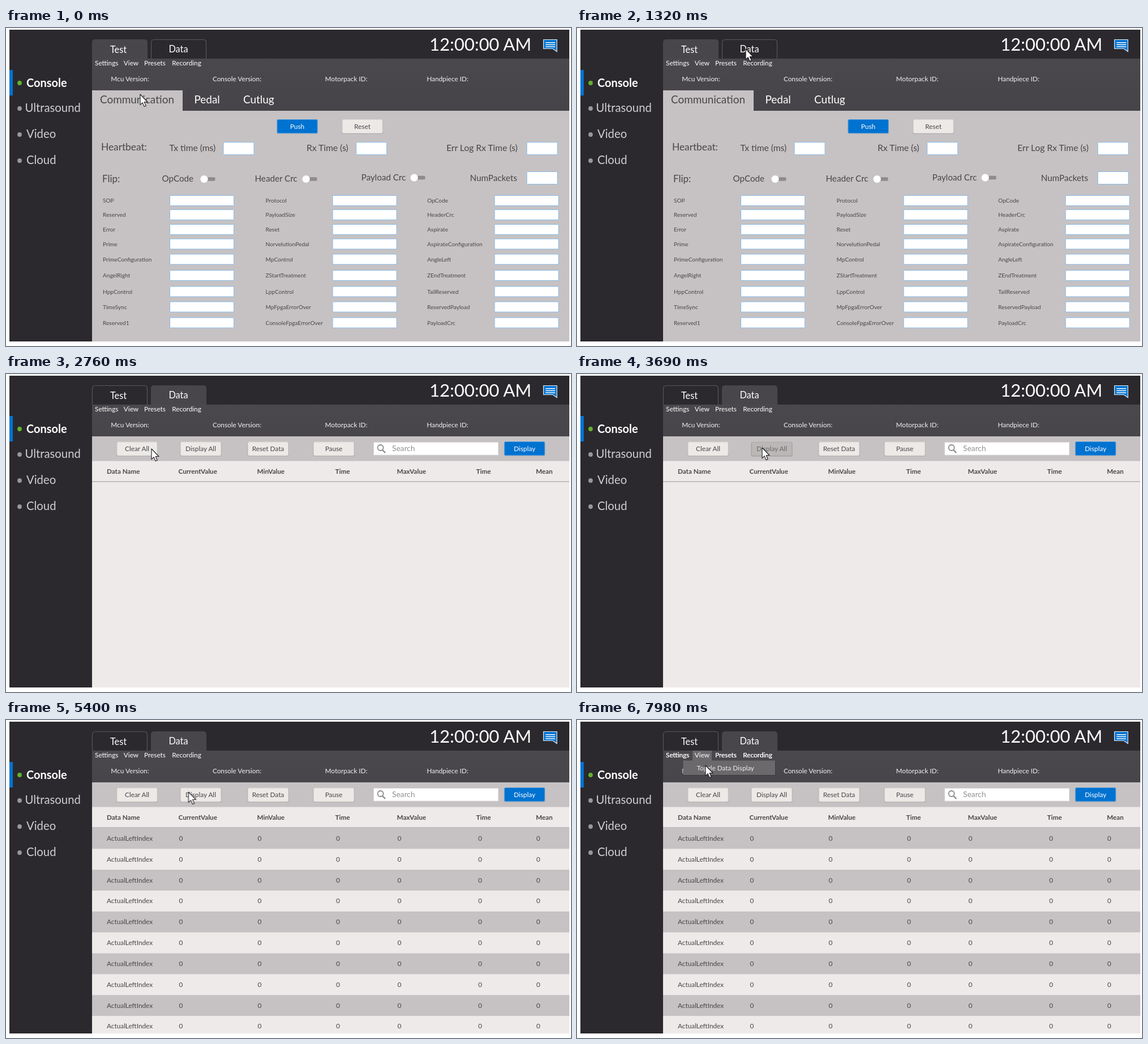
Animation of 998 by 561 pixels, one loop 8000 ms. Source, as an HTML page:

```html
<!DOCTYPE html>
<html lang="en">
<head>
<meta charset="utf-8">
<title>Console</title>
<style>
html, body { margin: 0; width: 100%; height: 100%; overflow: hidden; background: #fff; }
svg { display: block; width: 998px; height: 561px; }
text { font-family: Lato, "Open Sans", sans-serif; white-space: pre; }
.show { animation: 8s step-end infinite; }
#test { animation-name: test; }
#data { animation-name: data; }
#rows { animation-name: rows; }
#clearPress { animation-name: clearPress; }
#displayPress { animation-name: displayPress; }
#menu { animation-name: menu; }
#cursor { animation: cursor 8s infinite; }
@keyframes test { 0% { visibility: visible; } 17.625%, 100% { visibility: hidden; } }
@keyframes data { 0% { opacity: 0; } 17.625%, 100% { opacity: 1; } }
@keyframes rows { 0% { opacity: 1; } 34.5% { opacity: 0; } 56.625%, 100% { opacity: 1; } }
@keyframes clearPress { 0% { opacity: 0; } 31.5% { opacity: 1; } 34.5%, 100% { opacity: 0; } }
@keyframes displayPress { 0% { opacity: 0; } 45.75% { opacity: 1; } 56.625%, 100% { opacity: 0; } }
@keyframes menu { 0% { opacity: 0; } 90%, 100% { opacity: 1; } }
@keyframes cursor {
  0%, .75% { transform: translate(237px, 117px); animation-timing-function: ease-in-out; }
  15%, 25.875% { transform: translate(298px, 37px); animation-timing-function: ease-in; }
  28.5% { transform: translate(281px, 107px); animation-timing-function: ease-out; }
  31.875%, 40.125% { transform: translate(257px, 132px); animation-timing-function: ease-in-out; }
  45.75%, 66.375% { transform: translate(327px, 130px); animation-timing-function: ease-in-out; }
  70.125%, 72% { transform: translate(303px, 114px); animation-timing-function: ease-in-out; }
  77.625%, 79.875% { transform: translate(262px, 79px); animation-timing-function: ease-in-out; }
  87.75%, 94.125% { transform: translate(222px, 62px); animation-timing-function: ease-in-out; }
  99.75%, 100% { transform: translate(227px, 80px); }
}
</style>
</head>
<body>
<svg id="stage" viewBox="0 0 998 561">
  <defs>
    <linearGradient id="bar" x2="0" y2="1">
      <stop offset="0" stop-color="#4a484c"/><stop offset="1" stop-color="#464448"/>
    </linearGradient>
  </defs>
  <g id="frame"></g>
  <g id="test" class="show"></g>
  <g id="data" class="show">
    <g id="panel"></g>
    <g id="rows" class="show"></g>
    <g id="clearPress" class="show"></g>
    <g id="displayPress" class="show"></g>
  </g>
  <g id="labels"></g>
  <g id="menu" class="show"></g>
  <path id="cursor" d="M0 0V18.4L4.2 14.6L7.2 21.6L10.2 20.3L7.2 13.5H13Z"
    fill="#fff" stroke="#1c1c1e" stroke-width="1.1" stroke-linejoin="round"/>
</svg>
<script>
const DARK = '#2b292d', BAR = '#48464a', GREY = '#c6c2c3', LIGHT = '#eeeae9',
  BLUE = '#0072d0', INK = '#484649', WHITE = '#fff';

let layer;
const on = id => { layer = document.getElementById(id); };

function add(tag, attrs) {
  const el = document.createElementNS('http://www.w3.org/2000/svg', tag);
  for (const key in attrs) el.setAttribute(key, attrs[key]);
  return layer.appendChild(el);
}
const rect = (x, y, width, height, fill, more) =>
  add('rect', { x, y, width, height, fill, ...more });
const dot = (cx, cy, r, fill, more) => add('circle', { cx, cy, r, fill, ...more });
const path = (d, fill, more) => add('path', { d, fill, ...more });

// y is the middle of the capitals
function text(str, x, y, size, fill, more) {
  add('text', { x, y: y + size * .36, 'font-size': size, fill, ...more }).textContent = str;
}
const centred = (str, x, y, size, fill) => text(str, x, y, size, fill, { 'text-anchor': 'middle' });

function button(str, x, y, fill = '#ece9e7', ink = INK, edge = '#d9d4d0') {
  rect(x - .5, y + .5, 73, 25.5, '#9f9b9b', { rx: 2.5, opacity: .55 });
  rect(x + .5, y + .5, 71, 24, fill, { rx: 2, stroke: edge });
  centred(str, x + 36, y + 12.5, 11.8, ink);
}
const field = (x, y, w, h) =>
  rect(x + .5, y + .5, w - 1, h - 1, WHITE, { stroke: '#86b9e6', rx: 1 });

function toggle(x, y) {
  rect(x, y - 3.2, 19.5, 6.4, '#8f8b8c', { rx: 2 });
  dot(x, y, 6.6, WHITE, { stroke: '#d8d5d5', 'stroke-width': .6 });
}

function tab(x, active) {
  const r = x + 97;
  path(`M${x} 54V26Q${x} 20.5 ${x + 5} 20.5H${r - 5}Q${r} 20.5 ${r} 26V54`,
    active ? BAR : DARK, { stroke: active ? BAR : '#58565a', 'stroke-width': 1.2 });
}

on('frame');
rect(6, 3, 989, 550, DARK);
rect(152, 54, 843, 92, 'url(#bar)');
rect(6, 74, 6, 45, BLUE);
['Console', 'Ultrasound', 'Video', 'Cloud'].forEach((name, i) => {
  const y = [97, 141, 187, 233][i];
  dot(24, y + (i ? 1 : 0), 3.9, i ? '#99979b' : '#62b22f');
  text(name, i === 1 ? 33.5 : 36, y, i ? 20.3 : 20, i ? '#cfced0' : WHITE,
    { 'font-weight': i ? 400 : 700 });
});
centred('12:00:00 AM', 838, 29, 31, WHITE);
path('M949.5 20.5H973V41.5L966 36.5H949.5Z', BLUE, { stroke: '#e8f1fa', 'stroke-width': 1.2 });
for (const y of [25, 28.7, 32.4]) rect(953, y, 17, 1.5, WHITE);

on('test');
tab(152.5, true);
tab(256.5, false);
rect(152, 146, 843, 407, GREY);
rect(152, 110, 160, 37, GREY);
text('Communication', 166, 126, 18.9, INK);
text('Pedal', 332.5, 126, 18.9, WHITE);
text('Cutlug', 419, 126, 18.9, WHITE);
button('Push', 478.5, 161, BLUE, WHITE, '#4c9de0');
button('Reset', 593.5, 161);

text('Heartbeat:', 168, 210, 17.3, INK);
text('Tx time (ms)', 288.5, 211, 15.6, INK);
text('Rx Time (s)', 531, 211, 15.6, INK);
text('Err Log Rx Time (s)', 778, 211, 15.6, INK);
for (const x of [383.5, 618, 919.5]) field(x, 201, 55, 23);
text('Flip:', 170, 266, 17, INK);
text('OpCode', 275.5, 265.5, 15.2, INK);
text('Header Crc', 439.5, 265.5, 15.2, INK);
text('Payload Crc', 627.5, 264, 15.2, INK);
text('NumPackets', 819.5, 264.5, 15.2, INK);
field(919.5, 253, 55, 23);
toggle(350, 266.5);
toggle(530, 266.5);
toggle(721, 264);

const columns = [
  [171, 289, 'SOP Reserved Error Prime PrimeConfiguration AngelRight HppControl TimeSync Reserved1'],
  [458.5, 576.5, 'Protocol PayloadSize Reset NorvelutionPedal MpControl ZStartTreatment LppControl MpFpgaErrorOver ConsoleFpgaErrorOver'],
  [744, 862.5, 'OpCode HeaderCrc Aspirate AspirateConfiguration AngleLeft ZEndTreatment TailReserved ReservedPayload PayloadCrc']
];
const lines = [304.5, 329.5, 355.5, 381, 408, 436.5, 465, 492, 520];
for (const [x, fieldX, names] of columns) {
  names.split(' ').forEach((name, i) => {
    text(name, x, lines[i], 10.1, INK);
    field(fieldX, lines[i] - 9.5, 114, 19);
  });
}

on('panel');
tab(152.5, false);
tab(256.5, true);
rect(152, 110, 843, 44, GREY);
rect(152, 153.5, 843, 399.5, LIGHT);
button('Clear All', 195.5, 119.5);
button('Display All', 308, 119.5);
button('Reset Data', 427, 119.5);
button('Pause', 543, 119.5);
button('Display', 880, 119, BLUE, WHITE, '#4c9de0');
rect(649.5, 120.5, 220, 22.5, WHITE, { stroke: '#dcd9d9' });
dot(661.5, 130, 5, 'none', { stroke: '#8b898b', 'stroke-width': 1.8 });
path('M665 134L670 139', 'none', { stroke: '#8b898b', 'stroke-width': 2.4 });
text('Search', 682, 131, 13.7, '#929092');
const heads = ['Data Name', 'CurrentValue', 'MinValue', 'Time', 'MaxValue', 'Time', 'Mean'];
const headX = [178, 304.5, 443.5, 581.5, 690.5, 830.5, 936];
heads.forEach((name, i) => text(name, headX[i], 171.5, 11.7, INK, { 'font-weight': 700 }));
rect(152, 189, 843, 1.6, '#bab6b7');

on('rows');
for (let i = 0; i < 10; i++) {
  const top = 190.4 + i * 36.85;
  if (i % 2 === 0) rect(152, top, 843, 36.85, GREY);
  text('ActualLeftIndex', 178, top + 18.2, 11.8, INK);
  for (const x of [305.5, 444.5, 583, 691.5, 834, 936.7]) text('0', x, top + 18.2, 11.8, INK);
}

on('clearPress');
button('Clear All', 195.5, 119.5, '#bbb7b7', '#6c696c', '#aaa6a6');
on('displayPress');
button('Display All', 308, 119.5, '#bbb7b7', '#6c696c', '#aaa6a6');

on('labels');
centred('Test', 198.5, 38, 16.3, WHITE);
centred('Data', 304.5, 37.5, 16.3, WHITE);
const menuBar = () => [['Settings', 177.7], ['View', 221], ['Presets', 263], ['Recording', 319]]
  .forEach(([name, x]) => centred(name, x, 62, 11.8, WHITE));
menuBar();
[['Mcu Version:', 219], ['Console Version:', 408], ['Motorpack ID:', 601], ['Handpiece ID:', 780]]
  .forEach(([name, x]) => centred(name, x, 90, 11.8, '#f1f0f1'));

on('menu');
rect(204, 54, 34, 18, '#6b696c');
rect(187.5, 71.5, 162.5, 25.5, '#6b696c');
path('M187.5 97.5H350.5V72', 'none', { stroke: '#3b393d' });
menuBar();
centred('Toggle Data Display', 262.3, 84.5, 11.7, '#ecebec');
</script>
</body>
</html>
```
